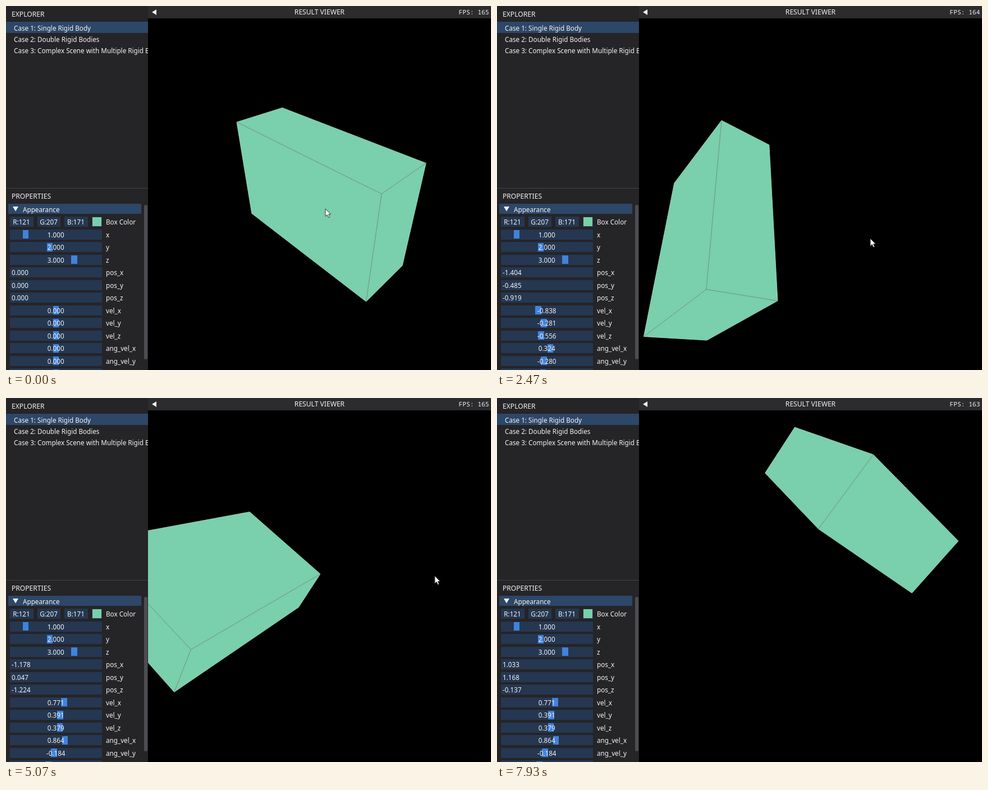
These frames come from a looping animation (864 px wide and 648 px high, 8 s). An HTML page:

```html
<!DOCTYPE html>
<html lang="en">
<head>
<meta charset="utf-8">
<title>Rigid body viewer</title>
<style>
  html, body { margin: 0; width: 100%; height: 100%; overflow: hidden; background: #000; }
  #stage { position: relative; width: 864px; height: 648px; overflow: hidden; color: #f4f4f4;
    font: 11.7px "Noto Sans", "Open Sans", sans-serif; }
  #stage div { position: absolute; box-sizing: border-box; white-space: pre; }
  #side { left: 0; top: 0; width: 253px; height: 648px; overflow: hidden; background: #252427; }
  #bar { left: 253px; top: 0; width: 611px; height: 22px; background: #2c2b2e; }
  .caps { font-size: 12.1px; }
  .field { height: 18px; background: #253751; }
  .head { background: #2d4768; }
  .grip { width: 10.6px; height: 15px; background: #4083dc; }
  .swatch { background: #79cfab; border: 1px solid #253751; }
  .thumb { background: #4d4c51; border-radius: 3px; }
  #fps { font: 11.25px "Noto Sans Mono", "DejaVu Sans Mono", monospace; }
  svg { position: absolute; left: 0; top: 0; }
</style>
</head>
<body>
<div id="stage">
  <div id="side"></div>
  <div id="bar"></div>
  <svg id="view" style="left:253px;top:22px" width="611" height="626" viewBox="253 22 611 626">
    <path id="faces" fill="#7acfac"/>
    <path id="outline" fill="none" stroke="#a9dfc8" stroke-width=".8"/>
    <path id="creases" fill="none" stroke="#6c7973" stroke-width="1" stroke-dasharray="2 .8"/>
  </svg>
  <svg width="864" height="648">
    <path d="M260 11L268 6V16Z M12 357H22L17 365.5Z" fill="#f4f4f4"/>
    <path id="cursor" d="M0 0V13.5L3.2 10.6L5.4 15.6L7.6 14.6L5.5 9.8H9.6Z"
      fill="#fff" stroke="#222" stroke-width=".9" stroke-linejoin="round"/>
  </svg>
</div>
<script>
const $ = id => document.getElementById(id);
const side = $("side"), bar = $("bar");

/* ---------- interface ---------- */
function box(parent, cls, x, y, w, h) {
  const el = document.createElement("div");
  el.className = cls;
  el.style.cssText = `left:${x}px;top:${y}px;` + (w ? `width:${w}px;` : "") + (h ? `height:${h}px` : "");
  parent.append(el);
  return el;
}

// x is the left edge, the middle or the right edge, depending on align
function label(parent, text, x, midY, align = "left", cls = "") {
  const el = document.createElement("div");
  const shift = { left: 0, center: -50, right: -100 }[align];
  el.className = cls;
  el.textContent = text;
  el.style.cssText = `left:${x}px;top:${midY - 10}px;line-height:20px;transform:translateX(${shift}%)`;
  parent.append(el);
  return el;
}

label(bar, "RESULT VIEWER", 305.5, 11, "center", "caps");
const fps = label(bar, "FPS: 165", 607.5, 11, "right");
fps.id = "fps";

label(side, "EXPLORER", 10, 14.5, "left", "caps");
box(side, "head", 0, 28, 253, 20);
label(side, "Case 1: Single Rigid Body", 14, 38.5);
label(side, "Case 2: Double Rigid Bodies", 14, 58.8);
label(side, "Case 3: Complex Scene with Multiple Rigid Bodies", 14, 79);
box(side, "", 0, 324, 253, 1).style.background = "#434247";
label(side, "PROPERTIES", 10, 338.5, "left", "caps");
box(side, "head", 4, 352, 237, 18);
label(side, "Appearance", 30, 361.5);

["R:121", "G:207", "B:171"].forEach((text, i) => {
  box(side, "field", 7 + i * 48.5, 375, 41.5);
  label(side, text, 27.5 + i * 48.5, 384, "center");
});
box(side, "swatch", 152.5, 375, 18.5, 18);
label(side, "Box Color", 178, 384);

const rowY = i => 406.5 + i * 22.5;

function row(i, name) {
  box(side, "field", 7, rowY(i) - 9, 164);
  label(side, name, 178, rowY(i));
}

function slider(i, name, toX) {
  row(i, name);
  const grip = box(side, "grip", 0, rowY(i) - 7.5);
  const text = label(side, "", 88.7, rowY(i), "center");
  return v => {
    grip.style.left = toX(v) - 5.3 + "px";
    text.textContent = v.toFixed(3);
  };
}

function entry(i, name) {
  row(i, name);
  const text = label(side, "", 10, rowY(i));
  return v => { text.textContent = v.toFixed(3); };
}

const axes = ["x", "y", "z"];
const size = [1, 2, 3];
axes.forEach((a, i) => slider(i, a, v => v * 43.2 - 8.3)(size[i]));
const signedX = v => 89 + v * 18.75;
const posOut = axes.map((a, i) => entry(3 + i, "pos_" + a));
const velOut = axes.map((a, i) => slider(6 + i, "vel_" + a, signedX));
const spinOut = axes.map((a, i) => slider(9 + i, "ang_vel_" + a, signedX));
box(side, "thumb", 246, 354, 6, 275);

/* ---------- motion ---------- */
const zero = [0, 0, 0];
// Free flight between impulses: pose at time `at`, constant velocity and world spin.
const flights = [
  { from: 0, at: 0, pos: zero, rot: zero, vel: zero, spin: zero },
  { from: .8, at: 1.533, pos: [-.616, -.221, -.395], rot: [.2127, -.2504, -.202],
    vel: [-.841, -.301, -.54], spin: [.29, -.342, -.276],
    shownVel: [-.841, -.281, -.56], shownSpin: [.319, -.289, -.371] },
  { from: 1.56, at: 2.467, pos: [-1.404, -.485, -.919], rot: [.4925, -.5292, -.5563],
    vel: [-.838, -.281, -.556], spin: [.324, -.28, -.371] },
  { from: 3.18, at: 4, pos: [-1.954, -.372, -1.582], rot: [.6945, -.9136, -.7363],
    vel: [.056, .378, -.322], spin: [-.108, -.222, .03] },
  { from: 4.065, at: 6, pos: [-.458, .412, -.87], rot: [-1.402, .7395, 2.4278],
    vel: [.771, .391, .379], spin: [.864, -.184, -.72] }
];
const rates = [[0, 165], [1.2, 164], [3.3, 163], [3.8, 165], [7.9, 163]];
// time, x, y of the pointer
const pointer = [
  [0, 569, 361], [.3, 569, 361], [.8, 478, 392], [1.53, 472, 437], [1.75, 560, 428],
  [2.1, 665, 414], [2.7, 665, 414], [2.98, 330, 400], [3.18, 400, 330], [3.7, 330, 328],
  [4, 337, 327], [4.1, 430, 325], [4.5, 640, 322], [5, 762, 318], [5.5, 776, 309],
  [6.2, 776, 309], [6.6, 840, 290]
];

const dot = (a, b) => a[0] * b[0] + a[1] * b[1] + a[2] * b[2];
const cross = (a, b) => [a[1] * b[2] - a[2] * b[1], a[2] * b[0] - a[0] * b[2], a[0] * b[1] - a[1] * b[0]];
const along = (p, d, k) => p.map((v, i) => v + d[i] * k);
const latest = (list, t, key) => list.filter(e => e[key] <= t).pop();

// rotate v by the rotation vector r
function turn(v, r) {
  const a = Math.hypot(...r);
  if (a < 1e-9) return v;
  const k = r.map(c => c / a), c = Math.cos(a), s = Math.sin(a);
  const kv = cross(k, v), p = dot(k, v) * (1 - c);
  return v.map((x, i) => x * c + kv[i] * s + k[i] * p);
}

/* ---------- camera at (-3, 3, 3), 60 degree view ---------- */
const eye = [-3, 3, 3], dist = Math.sqrt(27), focal = 313 * Math.sqrt(3);
const unit = v => v.map(c => c / Math.hypot(...v));
const right = unit([1, 0, 1]), up = unit([1, 2, -1]), back = unit(eye);

function project(p) {
  const k = focal / (dist - dot(p, back));
  return [558.5 + dot(p, right) * k, 334.5 - dot(p, up) * k];
}

function drawBox(pos, basis) {
  const points = [...Array(8).keys()].map(i =>
    project(basis.reduce((p, b, a) => along(p, b, (i >> a & 1 ? .5 : -.5) * size[a]), pos)));
  const at = i => points[i].map(c => c.toFixed(2)).join(" ");
  const edges = {};
  let fill = "";
  for (let a = 0; a < 3; a++) for (const s of [0, 1]) {
    const normal = basis[a].map(c => s ? c : -c);
    const mid = along(pos, normal, size[a] / 2);
    if (dot(normal, along(eye, mid, -1)) <= 0) continue;
    const u = 1 << (a + 1) % 3, v = 1 << (a + 2) % 3, o = s << a;
    const quad = [o, o | u, o | u | v, o | v];
    if (!s) quad.reverse();
    fill += "M" + quad.map(at).join("L") + "Z";
    quad.forEach((q, i) => {
      const n = quad[(i + 1) % 4], key = Math.min(q, n) + "," + Math.max(q, n);
      edges[key] = (edges[key] || 0) + 1;
    });
  }
  // an edge of one visible face is outline, of two a crease
  const lines = n => Object.keys(edges).filter(k => edges[k] === n)
    .map(k => "M" + k.split(",").map(at).join("L")).join("");
  $("faces").setAttribute("d", fill);
  $("outline").setAttribute("d", lines(1));
  $("creases").setAttribute("d", lines(2));
}

function drawPointer(t) {
  const i = pointer.findIndex(p => p[0] > t);
  $("cursor").style.display = i < 0 ? "none" : "";
  if (i < 0) return;
  const [t0, x0, y0] = pointer[i - 1], [t1, x1, y1] = pointer[i];
  const k = (t - t0) / (t1 - t0);
  $("cursor").setAttribute("transform", `translate(${x0 + (x1 - x0) * k} ${y0 + (y1 - y0) * k})`);
}

function draw(t) {
  const f = latest(flights, t, "from"), dt = t - f.at;
  const pos = along(f.pos, f.vel, dt);
  const swing = f.spin.map(c => c * dt);
  const basis = [[1, 0, 0], [0, 1, 0], [0, 0, 1]].map(b => turn(turn(b, f.rot), swing));
  drawBox(pos, basis);
  drawPointer(t);
  posOut.forEach((set, i) => set(pos[i]));
  velOut.forEach((set, i) => set((f.shownVel || f.vel)[i]));
  spinOut.forEach((set, i) => set((f.shownSpin || f.spin)[i]));
  fps.textContent = "FPS: " + latest(rates, t, 0)[1];
}

// 15 pictures per second, 8 s loop
const start = performance.now();
function tick() {
  const ms = Math.max(0, performance.now() - start) % 8000;
  draw(Math.floor((ms + 4) * .015) % 120 / 15);
  requestAnimationFrame(tick);
}
tick();
</script>
</body>
</html>
```
